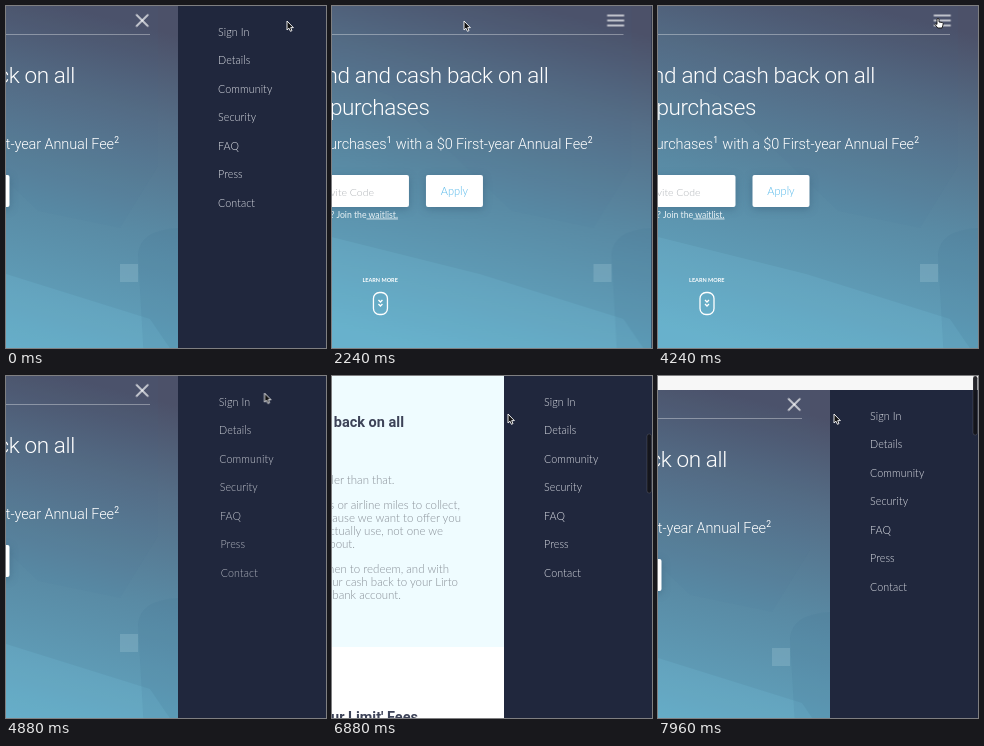
Recreate the animation shown at these times as an HTML page. Size 320 px wide and 342 px high, loop 8 s.

```html
<!DOCTYPE html>
<html lang="en">
<head>
<meta charset="utf-8">
<title>Slide-out menu</title>
<style>
html, body { margin: 0; width: 100%; height: 100%; overflow: hidden; background: #f7f7f7; }
svg { display: block; width: 100vw; height: 100vh; }

.din { font-family: Roboto, sans-serif; }
.geo { font-family: Lato, sans-serif; }
.end { text-anchor: end; }
.mid { text-anchor: middle; }
.title { font-size: 22.5px; font-weight: 300; letter-spacing: -.35px; }
.sub { font-size: 14.5px; font-weight: 300; letter-spacing: -.1px; }
.sup { font-size: 8.5px; }
.head { font-size: 14.5px; font-weight: 700; fill: #3d4358; }
.body { font-size: 11.5px; font-weight: 300; fill: #878e96; }
.item { font-size: 10.7px; font-weight: 300; letter-spacing: .1px; fill: #dcdfe6; }
.box { fill: #fff; filter: drop-shadow(0 2px 4px rgba(30, 60, 90, .3)); }
.line { fill: none; stroke: #fff; stroke-width: 1.3; }

/* One loop is 8 s, so 1% is 80 ms */
.scroll, .slide, .panel, .bounce, .bar, .item, .cursor, .arrow, .hand, .thumb {
  animation: 8s linear infinite;
}
.scroll { animation-name: scroll; }
.slide { animation-name: slide; }
.panel { animation-name: panel; }
.bounce { animation-name: bounce; }
.top { animation-name: top; }
.center { animation-name: center; }
.bottom { animation-name: bottom; }
.item { animation-name: item; animation-delay: calc(var(--i) * 15ms); }
.cursor { animation-name: cursor; }
.arrow { animation-name: arrow; animation-timing-function: step-end; }
.hand { animation-name: hand; animation-timing-function: step-end; }
.thumb { animation-name: thumb; }

@keyframes slide {
  0%, 22.5% { transform: translateX(-148px); animation-timing-function: ease; }
  28.5%, 53.2% { transform: none; animation-timing-function: ease; }
  59.2%, 100% { transform: translateX(-148px); }
}
@keyframes panel {
  0%, 22.5% { transform: none; animation-timing-function: ease; }
  28.5%, 53.2% { transform: translateX(148px); animation-timing-function: ease; }
  59.2%, 100% { transform: none; }
}
@keyframes top {
  0%, 22.5% { transform: rotate(45deg); animation-timing-function: ease; }
  28.5%, 53.2% { transform: translateY(-5px); animation-timing-function: ease; }
  59.2%, 100% { transform: rotate(45deg); }
}
@keyframes center {
  0%, 22.5% { opacity: 0; }
  26%, 53.2% { opacity: 1; }
  56%, 100% { opacity: 0; }
}
@keyframes bottom {
  0%, 22.5% { transform: rotate(-45deg); animation-timing-function: ease; }
  28.5%, 53.2% { transform: translateY(5px); animation-timing-function: ease; }
  59.2%, 100% { transform: rotate(-45deg); }
}
@keyframes item {
  0%, 21% { opacity: 1; transform: none; }
  21.3%, 57% { opacity: 0; transform: translateX(12px); animation-timing-function: ease-out; }
  62%, 100% { opacity: 1; transform: none; }
}
@keyframes scroll {
  0%, 70% { transform: none; animation-timing-function: ease-in; }
  73.5% { transform: translateY(-116px); }
  79% { transform: translateY(-390px); animation-timing-function: ease-out; }
  82.5%, 86.5% { transform: translateY(-433px); animation-timing-function: ease-in; }
  92% { transform: translateY(-200px); }
  97.5% { transform: none; animation-timing-function: ease-out; }
  99.5%, 100% { transform: translateY(14px); }
}
@keyframes thumb {
  0%, 69.9% { opacity: 0; transform: translateY(2px); }
  70% { opacity: 1; transform: translateY(2px); animation-timing-function: ease-in; }
  73.5% { transform: translateY(17px); }
  79% { transform: translateY(52.5px); animation-timing-function: ease-out; }
  82.5%, 86.5% { transform: translateY(58px); animation-timing-function: ease-in; }
  92% { transform: translateY(28px); }
  97.5% { transform: translateY(2px); animation-timing-function: ease-out; }
  99.5%, 100% { opacity: 1; transform: none; }
}
@keyframes bounce {
  0%, 97.5% { transform: none; animation-timing-function: ease-out; }
  99.5%, 100% { transform: translateY(14px); }
}
@keyframes cursor {
  0%, .5% { transform: translate(281px, 15px); animation-timing-function: ease-in-out; }
  10.5% { transform: translate(152px, 14px); animation-timing-function: ease-out; }
  18.5%, 29% { transform: translate(132px, 15px); animation-timing-function: ease-in; }
  33.5% { transform: translate(208px, 14.5px); animation-timing-function: ease-out; }
  41.5%, 57% { transform: translate(279px, 12px); animation-timing-function: ease-in-out; }
  70%, 100% { transform: translate(176px, 38px); }
}
@keyframes arrow {
  0% { opacity: 1; }
  13% { opacity: 0; }
  25% { opacity: 1; }
  38% { opacity: 0; }
  56% { opacity: 1; }
  100% { opacity: 1; }
}
@keyframes hand {
  0% { opacity: 0; }
  13% { opacity: 1; }
  25% { opacity: 0; }
  38% { opacity: 1; }
  56% { opacity: 0; }
  100% { opacity: 0; }
}
</style>
</head>
<body>
<svg viewBox="0 0 320 342" xml:space="preserve">
  <defs>
    <linearGradient id="sky" gradientUnits="userSpaceOnUse" x1="205" y1="0" x2="115" y2="350">
      <stop stop-color="#4c5169"/>
      <stop offset=".25" stop-color="#556e87"/>
      <stop offset=".55" stop-color="#598aa4"/>
      <stop offset="1" stop-color="#64acc7"/>
    </linearGradient>
  </defs>

  <g class="scroll"><g class="slide">
    <rect x="-20" width="500" height="354" fill="url(#sky)"/>
    <path d="M-20 60L60 90 180 205 262 222 300 160V0H-20z" fill="#3f6685" opacity=".05"/>
    <path d="M-20 226L148 268 292 313 320 354H-20z" fill="#7acce6" opacity=".16"/>
    <path d="M320 222Q282 224 280 248L286 354H480V222z" fill="#3d6a88" opacity=".12"/>
    <rect x="262" y="258" width="18" height="18" fill="#a5c8d6" opacity=".28"/>
    <path d="M-20 28.5H292" stroke="#fff" opacity=".35"/>

    <g transform="translate(284.2 14.5)" class="line">
      <path class="bar top" d="M-8.5 0h17"/>
      <path class="bar center" d="M-8.5 0h17"/>
      <path class="bar bottom" d="M-8.5 0h17"/>
    </g>

    <g class="din end" fill="#fff">
      <text class="title" x="217" y="76.5">2% extra, spend and cash back on all</text>
      <text class="title" x="98" y="108.5">purchases</text>
      <text class="sub" x="55" y="143">on all purchases</text>
      <text class="sup" x="60" y="137">1</text>
      <text class="sub" x="256" y="143">with a $0 First-year Annual Fee</text>
      <text class="sup" x="261" y="137">2</text>
    </g>

    <g class="geo">
      <rect class="box" x="-80" y="169" width="157.5" height="32" rx="2"/>
      <text class="end" x="42.5" y="189.5" font-size="10.5" font-weight="300" fill="#b0b4b8">Invite Code</text>
      <rect class="box" x="94.5" y="169" width="57" height="32" rx="2"/>
      <text class="mid" x="123" y="189" font-size="11" font-weight="300" fill="#54b8ea">Apply</text>
      <text class="end" x="66.5" y="211.5" font-size="8.7" fill="#e8f1f5">No code? Join the<tspan text-decoration="underline"> waitlist.</tspan></text>
      <text class="mid" x="48.7" y="275.5" font-size="5.5" font-weight="700" fill="#fff">LEARN MORE</text>
    </g>
    <g class="line">
      <rect x="42" y="286.5" width="14" height="22" rx="6"/>
      <path d="M47 294l2 2 2-2M47 298l2 2 2-2"/>
    </g>

    <rect x="-20" y="354" width="500" height="350" fill="#effcff"/>
    <rect x="-20" y="704" width="500" height="400" fill="#fff"/>
    <g class="end" transform="translate(148 433)">
      <text class="din head" x="72" y="51">Cash back on all</text>
      <g class="geo body">
        <text x="62.5" y="108">Simpler than that.</text>
        <text x="128" y="133">No points or airline miles to collect,</text>
        <text x="129" y="146">because we want to offer you</text>
        <text x="111" y="159">a card you actually use, not one we</text>
        <text x="23" y="172">about.</text>
        <text x="117" y="197">You choose when to redeem, and with</text>
        <text x="126" y="210">your cash back to your Lirto</text>
        <text x="69" y="223">or bank account.</text>
      </g>
      <text class="din head" x="86" y="346">No 'Over Your Limit' Fees</text>
    </g>
  </g></g>

  <g class="bounce"><g class="panel">
    <rect x="172" width="150" height="342" fill="#20273d"/>
    <g class="geo">
      <text class="item" style="--i:0" x="212" y="29.5">Sign In</text>
      <text class="item" style="--i:1" x="212" y="58">Details</text>
      <text class="item" style="--i:2" x="212" y="86.5">Community</text>
      <text class="item" style="--i:3" x="212" y="115">Security</text>
      <text class="item" style="--i:4" x="212" y="143.5">FAQ</text>
      <text class="item" style="--i:5" x="212" y="172">Press</text>
      <text class="item" style="--i:6" x="212" y="200.5">Contact</text>
    </g>
  </g></g>

  <rect class="thumb" x="315" width="4.5" height="59" rx="2.2" fill="#131419" fill-opacity=".92" stroke="#fff" stroke-opacity=".18" stroke-width=".7"/>

  <g class="cursor" stroke-linejoin="round">
    <path class="arrow" d="M0 0V9L2 7.2 3.4 10.3 5 9.6 3.7 6.6H6.4z" fill="#111" stroke="#fff" stroke-width=".9"/>
    <path class="hand" d="M0 1Q1-.4 2 1V4L5.5 4.6Q6.5 5 6 7L5 10H.8L-2 6.6Q-2 5 0 6.4z" fill="#fff" stroke="#111" stroke-width=".9"/>
  </g>
</svg>
</body>
</html>
```
